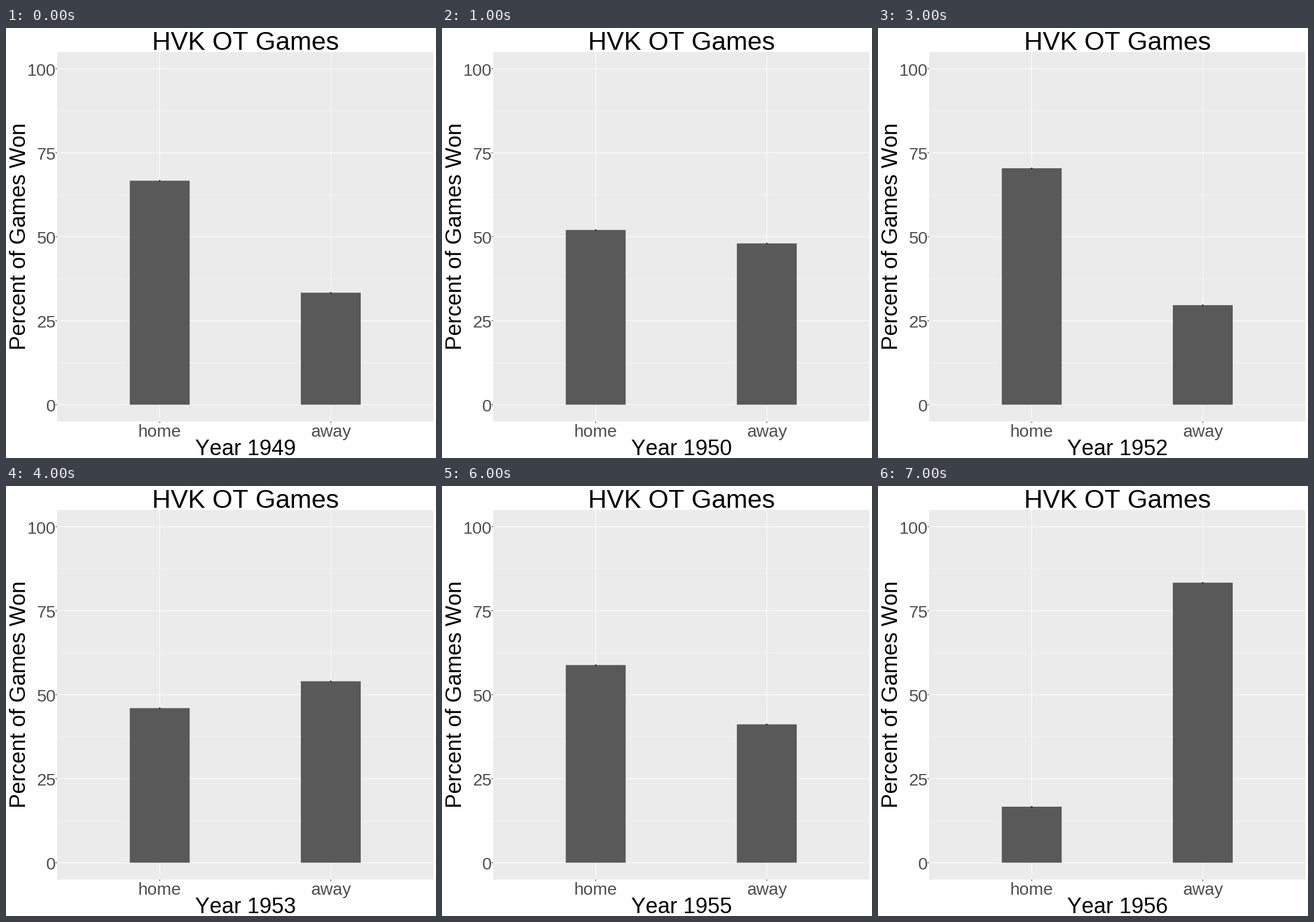
These frames come from a looping animation (748x748 px, 8 s). A matplotlib script:

```python
import matplotlib.pyplot as plt
from matplotlib.animation import FuncAnimation
from matplotlib.patches import Circle, Rectangle

SIZE, DPI = 748, 100
LEFT, TOP, RIGHT, BOTTOM = 88.9, 41.6, 743.5, 684.5
ZERO_Y, PX_PER_PERCENT = 655.3, 5.845
GROUP = (RIGHT - LEFT) / 2.2
CENTERS = [LEFT + 0.6 * GROUP, LEFT + 1.6 * GROUP]
BAR_WIDTH = 0.35 * GROUP
MAJOR, MINOR, TICK_LENGTH = 1.07, 0.53, 2.74
FIRST_YEAR = 1949
HOME_SHARE = [2 / 3, 0.52, 17 / 27, 19 / 27, 0.46, 0.5, 10 / 17, 1 / 6]

PANEL, BAR, TICK, LABEL = "#ebebeb", "#595959", "#333333", "#4d4d4d"

plt.rcParams["font.family"] = "Liberation Sans"
plt.rcParams["text.kerning_factor"] = 6  # effectively no kerning

fig = plt.figure(figsize=(SIZE / DPI, SIZE / DPI), dpi=DPI, facecolor="white")
ax = fig.add_axes([0, 0, 1, 1])
ax.set_xlim(0, SIZE)
ax.set_ylim(SIZE, 0)
ax.axis("off")


def box(x0, y0, x1, y1, color, z=1):
    return ax.add_patch(Rectangle((x0, y0), x1 - x0, y1 - y0, facecolor=color,
                                  linewidth=0, snap=False, zorder=z))


def hline(x0, x1, y, width, color):
    box(x0, y - width / 2, x1, y + width / 2, color, 2)


def vline(x, y0, y1, width, color):
    box(x - width / 2, y0, x + width / 2, y1, color, 2)


def write(x, y, text, px, color="black", angle=0):
    return ax.text(x, y, text, fontsize=px * 72 / DPI, color=color,
                   ha="left", va="baseline", rotation=angle,
                   rotation_mode="anchor", zorder=5)


def height_at(percent):
    return ZERO_Y - percent * PX_PER_PERCENT


box(LEFT, TOP, RIGHT, BOTTOM, PANEL)

# Horizontal grid, with ticks and labels on the major lines
for step in range(9):
    percent = step * 12.5
    y = height_at(percent)
    major = step % 2 == 0
    hline(LEFT, RIGHT, y, MAJOR if major else MINOR, "white")
    if major:
        text = f"{percent:.0f}"
        hline(LEFT - TICK_LENGTH, LEFT, y, MAJOR, TICK)
        write(87 - 16.7 * len(text), round(y) + 12, text, 30, LABEL)

for x, start, name in zip(CENTERS, (230, 531), ("home", "away")):
    vline(x, TOP, BOTTOM, MAJOR, "white")
    vline(x, BOTTOM, BOTTOM + TICK_LENGTH, MAJOR, TICK)
    write(start, 711, name, 30, LABEL)

write(254, 38, "HVK OT Games", 45)
write(34, 560, "Percent of Games Won", 38, angle=90)
year = write(329, 743, "", 38)

bars = [box(x - BAR_WIDTH / 2, ZERO_Y, x + BAR_WIDTH / 2, ZERO_Y, BAR, 3)
        for x in CENTERS]
dots = [ax.add_patch(Circle((x, 0), 1.15, facecolor="black", linewidth=0, zorder=4))
        for x in CENTERS]


def update(i):
    home = 100 * HOME_SHARE[i]
    for bar, dot, x, percent in zip(bars, dots, CENTERS, (home, 100 - home)):
        top = height_at(percent)
        bar.set_y(top)
        bar.set_height(ZERO_Y - top)
        dot.center = (x, top)
    year.set_text(f"Year {FIRST_YEAR + i}")
    return [*bars, *dots, year]


anim = FuncAnimation(fig, update, frames=len(HOME_SHARE), interval=1000,
                     repeat=True, repeat_delay=0, blit=False)
plt.show()
```
